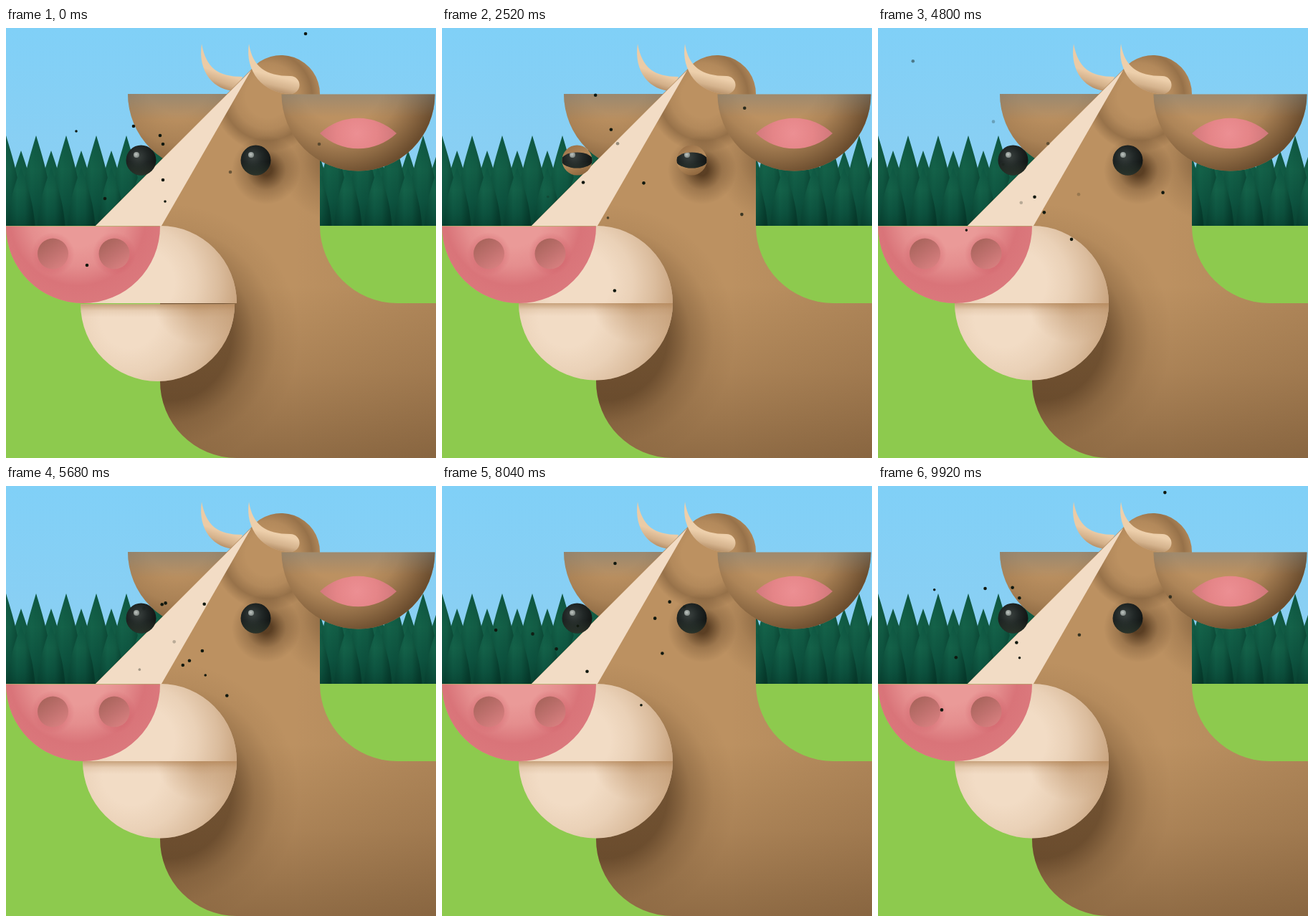
Write an HTML page with a canvas that moves like this. It is 600 by 600 pixels and loops after 10000 ms.

```html
<!DOCTYPE html>
<html lang="en">
<head>
<meta charset="utf-8">
<title>Cow and flies</title>
<style>
  html, body { margin: 0; width: 100%; height: 100%; overflow: hidden; }
  canvas { display: block; width: 600px; height: 600px; }
</style>
</head>
<body>
<canvas id="stage" width="600" height="600"></canvas>
<script>
const ctx = document.getElementById('stage').getContext('2d');
const TAU = Math.PI * 2, LOOP = 10000, STEP = 40;

function addStops(gradient, stops) {
  stops.forEach((color, i) => gradient.addColorStop(i / (stops.length - 1), color));
  return gradient;
}
const linear = (x1, y1, x2, y2, ...stops) => addStops(ctx.createLinearGradient(x1, y1, x2, y2), stops);
const radial = (x, y, r1, r2, ...stops) => addStops(ctx.createRadialGradient(x, y, r1, x, y, r2), stops);
// One tint at several opacities.
const tint = (rgb, ...alphas) => alphas.map(alpha => `rgba(${rgb},${alpha})`);

// Fill one path with several paints, bottom to top.
function paint(path, ...fills) {
  for (const fill of fills) {
    ctx.fillStyle = fill;
    ctx.fill(path);
  }
}
function disc(x, y, r, half) {
  const path = new Path2D();
  path.arc(x, y, r, 0, half ? Math.PI : TAU);
  path.closePath();
  return path;
}

const shapes = {
  body: new Path2D('M342 58 A54 54 0 0 1 438 92 V276 A108 108 0 0 0 546 384 H600 V600 H322 A107 107 0 0 1 215 492 V276 H125Z'),
  stripe: new Path2D('M342 59 L125 276 H217Z'),
  muzzle: new Path2D('M107 384 L215 276 A107 108 0 0 1 322 384Z'),
  earLeft: disc(277, 92, 107, true),
  earRight: disc(491.5, 92.5, 107, true),
  earInner: new Path2D('M438 147 A78 78 0 0 1 545 147 A78 78 0 0 1 438 147Z'),
  hornLeft: new Path2D('M273 22 C279 55 295 68 330 68 L322 88 C290 88 267 61 273 22Z'),
  hornRight: new Path2D('M339 22 C344 54 362 67 397 67 A12.5 12.5 0 0 1 397 92 C358 91 333 60 339 22Z'),
  jaw: disc(214.5, 384, 107.5, true),
  nose: disc(107.5, 276.5, 107.5, true)
};

const brown = '#bc9161', cream = '#f2dcc5';
const umber = '66,42,20', tan = '176,130,84', rose = '200,78,90', slate = '112,126,130';

const fills = {
  sky: linear(0, 0, 0, 190, '#80d0f7', '#8acff3'),
  tree: linear(0, 0, 0, 1, '#0f5a44', '#146249', '#0d5440', '#073f2e'),
  treeShade: linear(-.8, 0, .8, 0, ...tint('0,36,26', .25, 0, .1, .5)),
  body: [
    brown,
    linear(0, 360, 0, 600, ...tint(umber, 0, .14, .36)),
    linear(400, 0, 600, 0, ...tint(umber, 0, .1)),
    radial(225, 430, 90, 185, ...tint(umber, .58, .24, .06, 0)),
    radial(363, 198, 8, 48, ...tint(umber, .8, .25, 0)),
    radial(465, 185, 15, 85, ...tint(umber, .4, .14, 0)),
    radial(365, 95, 30, 78, ...tint(umber, 0, .08, .3, 0))
  ],
  earLeft: [
    brown,
    radial(240, 75, 45, 125, ...tint(umber, 0, .15, .5)),
    linear(0, 92, 0, 128, ...tint(slate, .45, 0))
  ],
  earRight: [
    brown,
    radial(468, 72, 60, 135, ...tint(umber, 0, .12, .38, .66)),
    linear(0, 92, 0, 124, ...tint(slate, .4, 0))
  ],
  earInner: radial(490, 147, 0, 56, '#ec8f93', '#e58588', '#cf777a'),
  hornLeft: [
    '#ebcba6',
    linear(310, 66, 302, 90, ...tint('138,94,52', 0, .25, .75))
  ],
  hornRight: [
    '#edcfab',
    linear(380, 68, 374, 93, ...tint('138,94,52', 0, .25, .72))
  ],
  muzzle: [
    cream,
    radial(190, 355, 45, 138, ...tint(tan, 0, .12, .35, .65))
  ],
  jaw: [
    cream,
    radial(175, 405, 40, 150, ...tint(tan, 0, .12, .35, .65)),
    radial(270, 378, 0, 62, ...tint(tan, .55, .25, 0)),
    linear(0, 384, 0, 402, ...tint(tan, .65, .15, 0))
  ],
  nose: [
    '#ea9a98',
    radial(100, 265, 40, 122, ...tint(rose, 0, .16, .5, .44))
  ]
};

function tree(x, top, halfWidth) {
  ctx.save();
  ctx.translate(x, top);
  ctx.scale(halfWidth, 290 - top);
  paint(new Path2D('M0 0 C.45 .26 1 .6 1 1 H-1 C-1 .6 -.45 .26 0 0Z'), fills.tree, fills.treeShade);
  ctx.restore();
}
function forest(from, to) {
  for (let x = from - 21; x <= to + 21; x += 42) tree(x, 171, 24);
  for (let x = from; x <= to; x += 42) tree(x, 150, 25);
  for (let x = from - 21; x <= to + 21; x += 42) tree(x, 194, 20);
}

function nostril(x) {
  paint(disc(x, 315, 30), radial(x, 315, 20, 30, ...tint(rose, .25, 0)));
  paint(disc(x, 315, 21.5), linear(x - 12, 296, x + 14, 334, '#a9645c', '#c0716e', '#d88080'));
}

function eye(x, open) {
  const y = 184.5, r = 21;
  if (open < 1) paint(disc(x, y, r), linear(x - 8, y - r, x + 8, y + r, '#9b7249', '#b98e5e', '#8b643c'));
  if (open <= 0) return;
  ctx.save();
  ctx.beginPath();
  ctx.ellipse(x, y, r + 1, (r + 1) * open, 0, 0, TAU);
  ctx.clip();
  paint(disc(x, y, r),
    radial(x - 4, y - 5, 2, 25, '#363d3b', '#202625', '#121514'),
    linear(x, y + 2, x, y + r, ...tint('58,72,58', 0, .6)));
  paint(disc(x - 6.5, y - 7.5, 4), radial(x - 7, y - 8, 0, 4, '#c0c6c2', '#858d89'));
  ctx.restore();
}

const starts = [[418, 8], [98, 144], [178, 137], [215, 150], [219, 162], [219, 212],
  [222, 242], [138, 238], [113, 331], [437, 162], [313, 201]];

// Each fly wanders on a closed curve around the face.
function fly([startX, startY], i, turn) {
  const swing = (speed, size) => size * Math.sin(turn * speed);
  const cx = 225, cy = 225;
  const x = cx + (startX - cx) * Math.cos(turn * (3 + i % 4)) + swing(4 + i % 3, 30 + i * 17 % 60) + swing(11 + i % 5, 18);
  const y = cy + (startY - cy) * Math.cos(turn * (4 + i % 3)) + swing(3 + i % 5, 80 - i * 23 % 60) - swing(9 + i % 4, 20);
  const phase = i > 8 ? 2.5 : i * .12;
  ctx.globalAlpha = Math.max(0, Math.min(1, 1.6 + 1.4 * Math.cos(turn * (5 + i % 3) + phase)));
  paint(disc(x, y, i === 1 || i === 6 ? 1.8 : 2.3), '#10180f');
  ctx.globalAlpha = 1;
}

function drawJaw(time) {
  const chew = (time + STEP) % LOOP;
  const angle = chew / 800 * TAU;
  ctx.save();
  if (chew > 0 && chew < 2400) ctx.translate(-9.5 * Math.sin(angle), 1.6 * Math.cos(angle));
  paint(shapes.jaw, ...fills.jaw);
  ctx.restore();
}

function draw(time) {
  const turn = time / LOOP * TAU;
  ctx.fillStyle = fills.sky;
  ctx.fillRect(0, 0, 600, 600);
  forest(0, 210);
  forest(456, 600);
  ctx.fillStyle = '#8dca4e';
  ctx.fillRect(0, 276, 600, 324);

  for (const name of ['earLeft', 'hornLeft', 'body']) paint(shapes[name], ...fills[name]);
  drawJaw(time);
  paint(shapes.muzzle, ...fills.muzzle);
  paint(shapes.stripe, cream);
  paint(shapes.nose, ...fills.nose);
  nostril(65.5);
  nostril(151);
  paint(shapes.earRight, ...fills.earRight);
  paint(shapes.earInner, fills.earInner);
  paint(shapes.hornRight, ...fills.hornRight);

  const open = Math.min(1, Math.abs(time - 2620) / 200);
  eye(188.5, open);
  eye(348.5, open);
  starts.forEach((start, i) => fly(start, i, turn));
}

const begin = performance.now();
function tick() {
  const elapsed = performance.now() - begin;
  draw(Math.floor(elapsed / STEP) * STEP % LOOP);
  requestAnimationFrame(tick);
}
tick();
</script>
</body>
</html>
```
